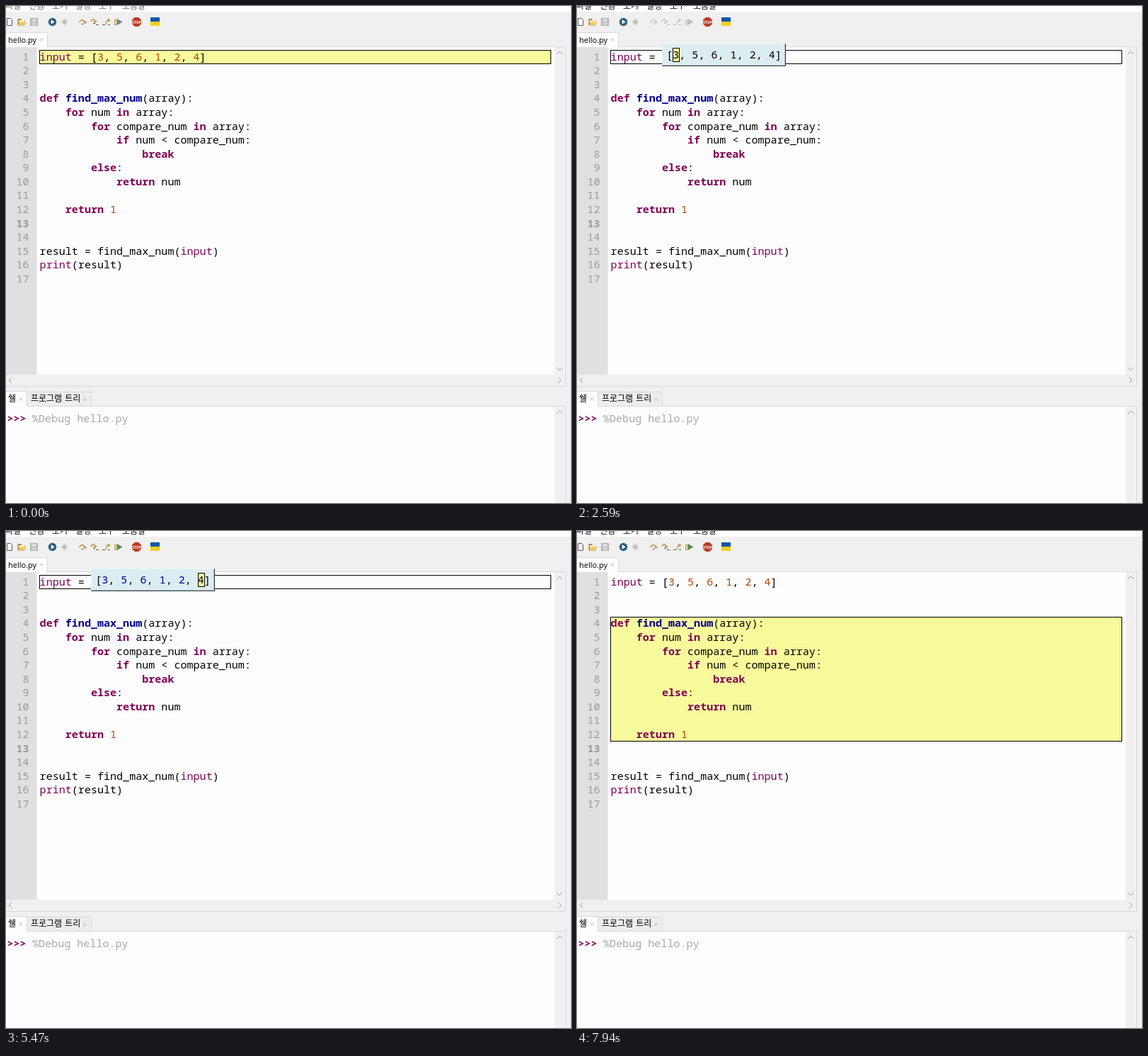
Write an HTML page with a canvas that moves like this. It is 798 by 701 pixels and loops after 8000 ms.

```html
<!DOCTYPE html>
<html lang="ko">
<head>
<meta charset="utf-8">
<title>Debugger</title>
<style>
html, body { margin: 0; width: 100%; height: 100%; overflow: hidden; background: #f0f0f0; }
canvas { display: block; width: 798px; height: 701px; }
</style>
</head>
<body>
<canvas id="stage" width="798" height="701"></canvas>
<script>
const ctx = document.getElementById('stage').getContext('2d');
const LOOP = 8000;
const CHAR = 9.04, LINE = 19.58, LEFT = 47.6;
const MONO = '15.05px "Noto Sans Mono", "DejaVu Sans Mono", monospace';
const UI = '11px "Open Sans", "Noto Sans", sans-serif';
const KO = '12px "Noto Sans CJK KR", "Noto Sans CJK", sans-serif';
const PAPER = '#fdfdfd', PANEL = '#f0f0f0', RULE = '#d9d9d9', YELLOW = '#f8fb9b';
const PLUM = '#7f0055', NAVY = '#00008b', RUST = '#b04600', BLACK = '#000';

const CODE = `input = [3, 5, 6, 1, 2, 4]


def find_max_num(array):
    for num in array:
        for compare_num in array:
            if num < compare_num:
                break
        else:
            return num

    return 1


result = find_max_num(input)
print(result)
`.split('\n');
const LIST = '[3, 5, 6, 1, 2, 4]';

// Moments when the step buttons are briefly greyed out
const BUSY = [1530, 2590, 2860, 4000, 4610, 6160, 7080];
// Focus reaches each list item, then its value is known
const FOCUS = [2590, 3140, 3730, 4340, 4940, 5470];
const VALUE = [2930, 3470, 4070, 4680, 5210, 5740];

function rect(x, y, w, h, color) {
  ctx.fillStyle = color;
  ctx.fillRect(x, y, w, h);
}

function frame(x, y, w, h, fill, stroke = BLACK) {
  rect(x, y, w, h, fill);
  ctx.strokeStyle = stroke;
  ctx.lineWidth = 1;
  ctx.strokeRect(x + 0.5, y + 0.5, w - 1, h - 1);
}

function poly(points, color, fill, width = 1) {
  ctx.beginPath();
  points.forEach(([x, y]) => ctx.lineTo(x, y));
  if (fill) {
    ctx.closePath();
    ctx.fillStyle = color;
    ctx.fill();
  } else {
    ctx.strokeStyle = color;
    ctx.lineWidth = width;
    ctx.stroke();
  }
}

function disc(x, y, r, color) {
  ctx.fillStyle = color;
  ctx.beginPath();
  ctx.arc(x, y, r, 0, Math.PI * 2);
  ctx.fill();
}

function label(str, x, y, font, color) {
  ctx.font = font;
  ctx.fillStyle = color;
  ctx.fillText(str, x, y);
}

function mono(str, x, y, color, bold) {
  ctx.font = (bold ? 'bold ' : '') + MONO;
  ctx.fillStyle = color;
  [...str].forEach((c, i) => ctx.fillText(c, x + i * CHAR, y));
}

function tokenStyle(word, before) {
  if (/^(def|for|in|if|break|else|return)$/.test(word)) return [PLUM, true];
  if (/^(input|print)$/.test(word)) return [PLUM, false];
  if (/^\d/.test(word)) return [RUST, false];
  return before === 'def ' ? [NAVY, true] : [BLACK, false];
}

function codeLine(str, y) {
  for (const m of str.matchAll(/\w+|[^\w\s]+/g)) {
    const [color, bold] = tokenStyle(m[0], str.slice(0, m.index));
    mono(m[0], LEFT + m.index * CHAR, y, color, bold);
  }
}

function chevron(x, y, dx, dy) {
  const pts = dx ? [[x - 2 * dx, y - 4], [x + 2 * dx, y], [x - 2 * dx, y + 4]]
                 : [[x - 4, y - 2 * dy], [x, y + 2 * dy], [x + 4, y - 2 * dy]];
  poly(pts, '#a0a0a0');
}

function cross(x, y) {
  poly([[x - 2, y - 2], [x + 2, y + 2]], '#b8b8b8');
  poly([[x + 2, y - 2], [x - 2, y + 2]], '#b8b8b8');
}

function hop(x, y, w, color, dark) {
  ctx.strokeStyle = color;
  ctx.lineWidth = 1.7;
  ctx.beginPath();
  ctx.moveTo(x, y + 2);
  ctx.quadraticCurveTo(x + w / 2, y - 5, x + w - 1, y + 2);
  ctx.stroke();
  poly([[x + w - 4, y + 1], [x + w + 2, y + 1], [x + w - 1, y + 4.5]], color, true);
  poly([[x + 3, y + 4.5], [x + 6, y + 4.5]], dark);
}

function stepButtons(t, busy) {
  const tan = busy ? '#c9c9c9' : '#c39c58';
  const dark = busy ? '#b5b5b5' : '#66543a';
  hop(103.5, 21, 9, tan, dark);
  hop(120, 20, 7, tan, dark);
  poly([[127, 26.5], [131, 26.5]], dark);
  poly([[136, 26.5], [140, 26.5]], dark);
  poly([[141, 26], [143, 20], [146, 20]], tan, false, 1.5);
  poly([[144, 17.5], [148, 20], [144, 23]], tan, true);
  poly([[144, 26.5], [147, 26.5]], dark);
  frame(153, 19, 4, 8, busy ? '#d8d8d8' : '#ead6a6', tan);
  const go = busy ? '#bcbcbc' : t < 1530 ? '#6684a1' : '#4f915c';
  poly([[157, 18], [164.5, 22.5], [157, 27]], go, true);
}

function toolbar(t, busy) {
  rect(0, 0, 798, 8, '#fff');
  const ink = t < 330 ? '#6d6d6d' : '#111';
  ['파일', '편집', '보기', '실행', '도구', '도움말']
    .forEach((s, i) => label(s, -1 + i * 33, 4, KO, ink));

  const page = [[1.5, 17.5], [6.5, 17.5], [8.5, 19.5], [8.5, 27.5], [1.5, 27.5], [1.5, 17.5]];
  poly(page, '#fff', true);
  poly(page, '#555');

  poly([[16.5, 27.5], [16.5, 18], [21, 18], [22, 20], [26.5, 20], [26.5, 27.5]], '#a9853a', true);
  rect(18, 20, 8, 4, '#f8edc6');
  poly([[17, 27], [20, 22.5], [29, 22.5], [26, 27]], '#f3c95f', true);

  frame(34, 17, 11, 11, '#c4c4c4', '#ababab');
  rect(37, 18, 5, 4, '#dedede');
  rect(37, 24, 5, 3, '#d8d8d8');

  disc(65.5, 22.5, 5.7, '#28617f');
  poly([[63.7, 19.3], [68.7, 22.5], [63.7, 25.7]], '#fff', true);

  for (let i = 0; i < 4; i++) {
    const a = i * Math.PI / 4, c = Math.cos(a) * 5, s = Math.sin(a) * 5;
    poly([[82.5 - c, 22.5 - s], [82.5 + c, 22.5 + s]], '#b9b9b9');
  }
  disc(82.5, 22.5, 2.6, '#bdbdbd');

  stepButtons(t, busy);

  const octagon = Array.from({ length: 8 }, (_, i) => {
    const a = (i + 0.5) * Math.PI / 4;
    return [184.5 + 7 * Math.cos(a), 22.5 + 7 * Math.sin(a)];
  });
  poly(octagon, '#bd3a20', true);
  ctx.textAlign = 'center';
  label('STOP', 184.5, 24.6, 'bold 5px "Open Sans", sans-serif', '#fff');
  ctx.textAlign = 'left';

  rect(204, 16, 13, 6, '#0858a8');
  rect(204, 22, 13, 6, '#f5cf20');
}

function editorShell() {
  rect(0, 57, 790, 1, RULE);
  frame(-1, 37, 60, 22, PAPER, RULE);
  rect(0, 57, 58, 2, PAPER);
  label('hello.py', 3, 52, UI, BLACK);
  cross(50, 47.5);

  rect(43, 58, 732, 462, PAPER);
  rect(0, 58, 43.5, 462, '#e0e0e0');
  rect(790, 57, 1, 480, RULE);
  rect(0, 536, 791, 1, RULE);
  rect(797, 37, 1, 664, '#e2e2e2');
  chevron(782, 66, 0, -1);
  chevron(782, 512, 0, 1);
  chevron(6, 528, -1, 0);
  chevron(782, 528, 1, 0);
}

function shellPane() {
  frame(29, 544, 92, 21, '#ededed', RULE);
  ctx.wordSpacing = '1.4px';
  label('프로그램 트리', 35, 558, KO, BLACK);
  ctx.wordSpacing = '0px';
  cross(111.5, 555);
  rect(0, 564, 791, 1, RULE);
  rect(790, 564, 1, 137, RULE);
  frame(-1, 543, 31, 23, PAPER, RULE);
  rect(0, 565, 775, 136, PAPER);
  rect(0, 564, 29, 2, PAPER);
  label('쉘', 3, 558, KO, BLACK);
  cross(21, 554.5);
  chevron(782, 573, 0, -1);
  mono('>>>', 1.5, 587, PLUM, true);
  mono('%Debug hello.py', 37, 587, '#a9a9a9');
}

function code(t) {
  if (t >= 7940) frame(47, 121, 723, 176, YELLOW);
  else frame(47, 62, 723, 20, t < 1600 || t >= 7150 ? YELLOW : PAPER);
  CODE.forEach((str, i) => {
    const y = Math.round(76.6 + i * LINE), n = String(i + 1);
    mono(n, 32.5 - n.length * CHAR, y, '#999', n === '13');
    codeLine(str, y);
  });
}

function popup(t) {
  if (t < 1600 || t >= 7940) return;
  const x = 126.2;
  rect(120, 53, 175, 32, '#dcedf2');
  rect(120, 53, 174, 1, '#eaf3f6');
  rect(120, 53, 1, 31, '#eaf3f6');
  rect(121, 83, 173, 1, '#a9b8bd');
  rect(293, 54, 1, 30, '#a9b8bd');
  rect(120, 84, 175, 1, '#3c4244');
  rect(294, 53, 1, 32, '#3c4244');

  const whole = t < 2590 || (t >= 6220 && t < 7150);
  const item = FOCUS.filter(f => t >= f).length - 1;
  if (whole) frame(126, 59, 163, 20, YELLOW);
  else if (t < 7150) frame(Math.round(x + (1 + item * 3) * CHAR), 59, 10, 20, YELLOW);

  [...LIST].forEach((c, i) => {
    const known = i % 3 === 1 && t >= VALUE[(i - 1) / 3];
    mono(c, x + i * CHAR, 74, known || t >= 7150 ? NAVY : BLACK);
  });
}

function draw(now) {
  const t = now % LOOP;
  const busy = BUSY.some(b => t >= b && t < b + (b === 6160 ? 60 : 70));
  rect(0, 0, 798, 701, PANEL);
  toolbar(t, busy);
  editorShell();
  shellPane();
  code(t);
  popup(t);
}

const start = performance.now();
function tick() {
  draw(performance.now() - start);
  requestAnimationFrame(tick);
}
tick();
</script>
</body>
</html>
```
